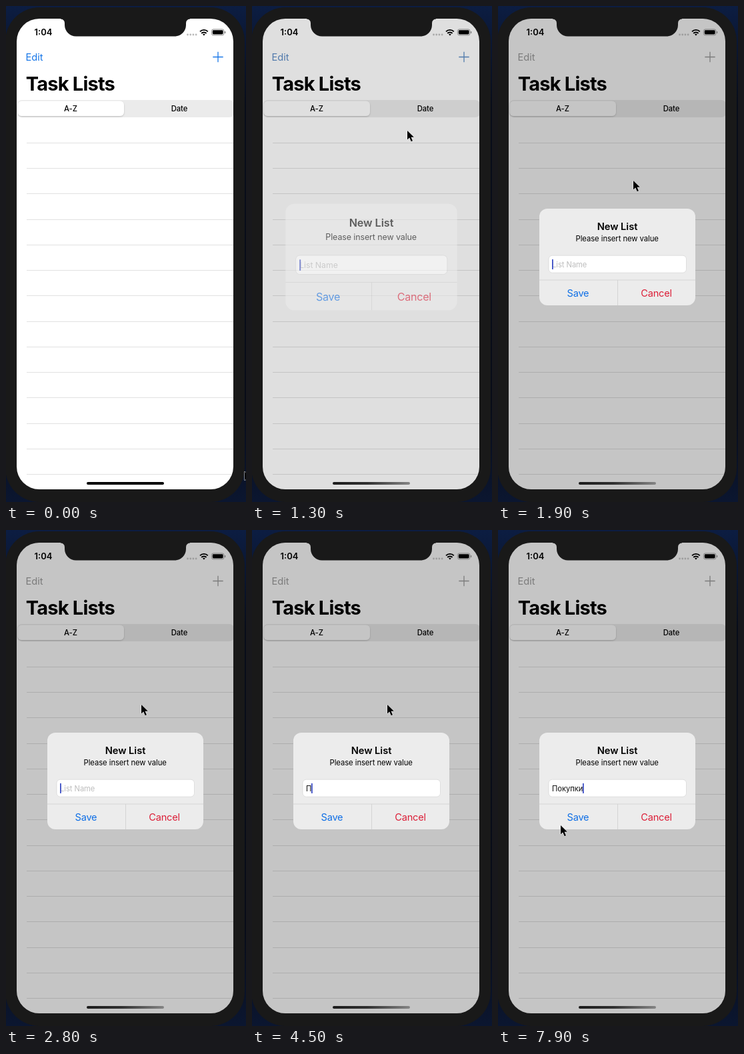
These frames come from a looping animation (360x744 px, 8 s). An HTML page:

```html
<!DOCTYPE html>
<html lang="en">
<head>
<meta charset="utf-8">
<title>Task Lists</title>
<style>
  html, body { margin: 0; width: 100%; height: 100%; overflow: hidden; background: #0b0d14; }
  svg { display: block; width: 100vw; height: 100vh; }
  text { font-family: Inter, Roboto, sans-serif; white-space: pre; }
  .mid { text-anchor: middle; }
  .nav { font-size: 14.7px; letter-spacing: -.05px; }
  .small { font-size: 11.3px; letter-spacing: -.08px; }
  .action { font-size: 14.6px; letter-spacing: -.25px; text-anchor: middle; }
</style>
</head>
<body>
<svg viewBox="0 0 360 744" preserveAspectRatio="none">
  <defs>
    <linearGradient id="desk" x2="0" y2="1">
      <stop offset="0" stop-color="#0c1d42"/>
      <stop offset=".2" stop-color="#080d1a"/>
      <stop offset=".8" stop-color="#080c18"/>
      <stop offset="1" stop-color="#0b1630"/>
    </linearGradient>
    <linearGradient id="homeTint">
      <stop offset="0" stop-color="#1c1c1c"/>
      <stop offset=".45" stop-color="#303030"/>
      <stop offset="1" stop-color="#858585"/>
    </linearGradient>
    <clipPath id="screen"><rect x="16" y="19" width="325" height="706" rx="34"/></clipPath>
    <filter id="soft" x="-10%" y="-30%" width="120%" height="170%">
      <feDropShadow dx="0" dy="1" stdDeviation="1.1" flood-opacity=".2"/>
    </filter>
  </defs>

  <rect width="360" height="744" fill="url(#desk)"/>
  <rect x="-1" y="2" width="359" height="742" rx="51" fill="#191919"/>

  <g clip-path="url(#screen)">
    <rect x="16" y="19" width="325" height="706" fill="#fff"/>
    <g id="rows" stroke="#e1e1e1"></g>

    <g id="tint">
      <text class="nav" x="29.5" y="82">Edit</text>
      <path d="M310.3 76.5h15.4M318 68.8v15.4" stroke="currentColor" stroke-width="1.3"/>
    </g>
    <text x="29.8" y="127" font-size="29" font-weight="700" letter-spacing="-.8">Task Lists</text>

    <rect x="17" y="141" width="325" height="26" rx="7" fill="#ebebeb"/>
    <rect x="17.5" y="142.5" width="159.5" height="22.5" rx="6" fill="#fff" filter="url(#soft)"/>
    <g class="small mid" font-weight="500">
      <text x="97" y="158">A-Z</text>
      <text x="260" y="158">Date</text>
    </g>

    <rect id="dim" x="16" y="19" width="325" height="706"/>

    <text x="42.5" y="44" font-size="13" font-weight="600">1:04</text>
    <g id="signal" fill="#777" fill-opacity=".5"></g>
    <g fill="none" stroke="#000" stroke-width="1.9">
      <path d="M291 38.3a8.3 8.3 0 0 1 11.8 0M293.2 41a5.2 5.2 0 0 1 7.4 0"/>
      <path d="M296.9 44.6l-1.9-2a2.8 2.8 0 0 1 3.8 0z" fill="#000" stroke="none"/>
      <rect x="308.4" y="34.9" width="18.6" height="9" rx="2.6" stroke="#777" stroke-width=".8"/>
      <rect x="309.8" y="36.3" width="15.8" height="6.2" rx="1.4" fill="#000" stroke="none"/>
      <path d="M328.6 37.9v3" stroke="#777" stroke-width="1.2"/>
    </g>
    <rect id="home" x="121" y="714" width="116" height="4" rx="2"/>

    <g id="dialog">
      <rect x="62" y="304" width="234" height="145" rx="12" fill="#ececec"/>
      <path d="M62 411h234M179.5 411v38" stroke="#cfcfcf" stroke-width=".8"/>
      <text class="nav mid" x="179" y="335.5" font-weight="600">New List</text>
      <text class="small mid" x="178.7" y="353">Please insert new value</text>
      <rect x="76" y="374.2" width="206.5" height="26" rx="5.5" fill="#fff" stroke="#d4d4d4" stroke-width=".7"/>
      <text id="entry" x="81" y="391.5" font-size="11.2" letter-spacing="-.05"></text>
      <rect id="caret" y="380" width="1.8" height="15" fill="#3f51c8"/>
      <text class="action" x="120" y="436" fill="#0f6fe6">Save</text>
      <text class="action" x="237.5" y="436" fill="#dc1f38">Cancel</text>
    </g>
  </g>

  <path d="M82 18v1.5q6 .5 6 6.5v2.500a17 17 0 0 0 17 17h148a17 17 0 0 0 17-17v-2.500q0-6 6-6.500v-1.500z" fill="#191919"/>
  <path id="pointer" d="M0 0v13.500l3.200-2.900 2.500 5.600 2.300-1-2.400-5.500h4.300z" fill="#000" stroke="#fff" stroke-width="1" paint-order="stroke"/>
</svg>

<script>
const LOOP = 8000, STEP = 100;
const $ = id => document.getElementById(id);
const mix = (a, b, k) => a + (b - a) * k;
const smooth = k => k * k * (3 - 2 * k);

$('rows').innerHTML = Array.from({ length: 14 }, (_, i) => {
  const y = Math.round(205 + i * 38.24) + .5;
  return `<path d="M31 ${y}H341"/>`;
}).join('');
$('signal').innerHTML = [272.500, 276.700, 280.900, 285.100]
  .map(x => `<circle cx="${x}" cy="43" r="1.4"/>`).join('');

// Each key: time, then values
const pointerKeys = [
  [0, 358, 698], [400, 295, 386], [700, 267, 90], [900, 317, 76], [1100, 317, 77],
  [1200, 297, 111], [1300, 233, 187], [1400, 219, 207], [1700, 203, 262],
  [6600, 203, 262], [7000, 128, 375], [7400, 92, 440], [7600, 94, 443]
];
// dim, tint fade, dialog opacity, dialog scale
const alertKeys = [
  [1200, 0, 0, 0, 1.18], [1300, .125, .5, .58, 1.1],
  [1400, .207, .93, .96, 1.017], [1600, .227, 1, 1, 1]
];
const word = 'Покупки';
const keyPresses = [4400, 4700, 4900, 5400, 5600, 6000, 6300];

function sample(keys, t, ease = k => k) {
  const next = keys.findIndex(key => key[0] > t);
  if (next === 0) return keys[0].slice(1);
  if (next < 0) return keys[keys.length - 1].slice(1);
  const a = keys[next - 1], b = keys[next];
  const k = ease((t - a[0]) / (b[0] - a[0]));
  return a.slice(1).map((v, i) => mix(v, b[i + 1], k));
}

function render(t) {
  const [dim, fade, alpha, scale] = sample(alertKeys, t);
  $('dim').setAttribute('opacity', dim);
  const rgb = [24, 119, 232].map(c => Math.round(mix(c, 159, fade)));
  $('tint').setAttribute('fill', `rgb(${rgb})`);
  $('tint').setAttribute('color', `rgb(${rgb})`);
  $('home').setAttribute('fill', fade > 0 ? 'url(#homeTint)' : '#000');

  $('dialog').setAttribute('opacity', alpha);
  $('dialog').setAttribute('transform',
    `translate(179 376.500) scale(${scale}) translate(-179 -376.500)`);

  const count = keyPresses.filter(press => press <= t).length;
  const entry = $('entry');
  entry.textContent = count ? word.slice(0, count) : 'List Name';
  entry.setAttribute('fill', count ? '#111' : '#bdbdbd');
  $('caret').setAttribute('x', 81 + (count ? entry.getComputedTextLength() - .3 : 0));

  const [x, y] = sample(pointerKeys, t, smooth);
  $('pointer').setAttribute('transform', `translate(${x} ${y})`);
}

const start = performance.now();
function tick() {
  const t = (performance.now() - start) % LOOP;
  render(Math.floor(t / STEP) * STEP);
  requestAnimationFrame(tick);
}
tick();
</script>
</body>
</html>
```
